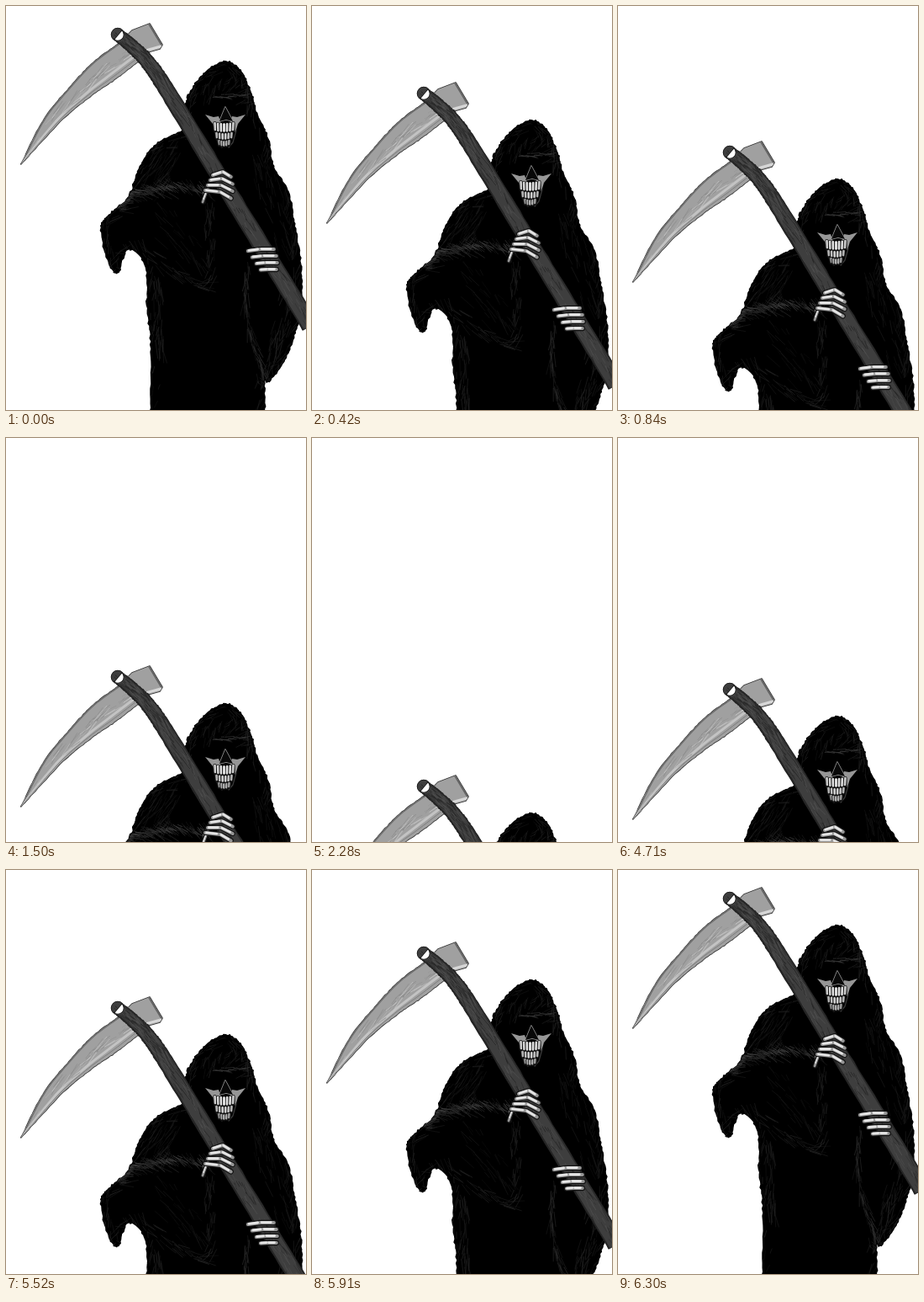
Animation of 357 by 480 pixels, one loop 7140 ms. Source, as an HTML page with a canvas:

```html
<!DOCTYPE html>
<html lang="en">
<head>
<meta charset="utf-8">
<title>Reaper</title>
<style>
  html, body { margin: 0; width: 100%; height: 100%; overflow: hidden; background: #fff; }
  main { position: fixed; inset: 0; overflow: hidden; contain: strict; }
  canvas { display: block; animation: sink 7140ms -1ms infinite; }
  /* 5px every 30ms; the rise skips ahead twice */
  @keyframes sink {
    0% { transform: translateY(0); animation-timing-function: steps(92); }
    38.65546% { transform: translateY(460px); animation-timing-function: steps(1); }
    50.42017% { transform: translateY(460px); animation-timing-function: steps(12); }
    55.46218% { transform: translateY(400px); animation-timing-function: steps(1); }
    55.88235% { transform: translateY(390px); animation-timing-function: steps(17); }
    63.02521% { transform: translateY(305px); animation-timing-function: steps(1); }
    63.44538% { transform: translateY(295px); animation-timing-function: steps(59); }
    88.23529%, 100% { transform: translateY(0); }
  }
</style>
</head>
<body>
<main><canvas id="reaper" width="357" height="480"></canvas></main>
<script>
const g = document.getElementById('reaper').getContext('2d');
g.lineCap = g.lineJoin = 'round';

let seed = 11;
const rnd = () => (seed = (seed * 16807) % 2147483647) / 2147483647;
const vary = r => (rnd() * 2 - 1) * r;
const gray = (v, a = 1) => `rgba(${v},${v},${v},${a})`;

// Smooth curve through key points, as a function of t in 0..1
const curve = (...pts) => t => {
  const n = pts.length - 1, i = Math.max(0, Math.min(n - 1, Math.floor(t * n))), u = t * n - i;
  const [a, b, c, d] = [i - 1, i, i + 1, i + 2].map(k => pts[Math.max(0, Math.min(n, k))]);
  return [0, 1].map(k => b[k] + 0.5 * u * (c[k] - a[k]
    + u * (2 * a[k] - 5 * b[k] + 4 * c[k] - d[k] + u * (3 * (b[k] - c[k]) + d[k] - a[k]))));
};

function heading(at, t) {
  const [x0, y0] = at(t - 0.004), [x1, y1] = at(t + 0.004);
  return Math.atan2(y1 - y0, x1 - x0);
}

const sample = (at, n, rough = 0) =>
  Array.from({ length: n + 1 }, (_, i) => at(i / n).map(v => v + vary(rough)));
const outline = pts => new Path2D('M' + pts.map(p => p.join(' ')).join('L') + 'Z');

function paint(path, fill, edge) {
  g.strokeStyle = edge;
  g.lineWidth = 1.6;
  g.stroke(path);
  g.fillStyle = fill;
  g.fill(path);
}

function line(pts, color, width) {
  g.strokeStyle = color;
  g.lineWidth = width;
  g.beginPath();
  pts.forEach(p => g.lineTo(...p));
  g.stroke();
}

function inside(path, draw) {
  g.save();
  g.clip(path);
  draw();
  g.restore();
}

// Loose strokes that follow a curve, turned from it by tilt
function hairs(n, at, spread, length, tilt, light, width = 0.8) {
  for (let i = 0; i < n; i++) {
    const t = rnd(), a = heading(at, t) + tilt + vary(0.25), len = length * (0.5 + rnd());
    const [x, y] = at(t).map(v => v + vary(spread));
    line([[x, y], [x + Math.cos(a) * len, y + Math.sin(a) * len]], gray(light, 0.3 + rnd() * 0.6), width);
  }
}

function robe() {
  const sleeve = [[166, 308], [145, 289], [133, 317], [121, 302], [113, 264], [123, 248], [146, 226]];
  const hood = [[213, 120], [221, 99], [237, 79], [260, 66], [278, 76], [291, 101], [298, 126]];
  const rim = curve([172, 485], [173, 410], [168, 360], ...sleeve,
    [160, 190], [180, 163], [213, 145], ...hood, [312, 158], [318, 190], [336, 222], [343, 258],
    [350, 300], [352, 345], [345, 385], [332, 420], [313, 446], [308, 446], [308, 485]);
  const cloak = outline(sample(rim, 400, 0.9));
  paint(cloak, '#000', '#000');

  inside(cloak, () => {
    hairs(420, rim, 9, 11, 0.3, 36);
    hairs(50, curve([226, 112], [258, 98], [284, 110]), 10, 9, -0.8, 34);
    hairs(22, curve([246, 107], [281, 107]), 2, 7, 0, 62);
    hairs(60, curve([195, 165], [180, 215]), 14, 13, 0.3, 30);
    // Raised sleeve: bright ridge, then its hanging hem
    const ridge = curve([132, 240], [152, 222], [195, 213], [234, 216]);
    hairs(110, ridge, 4, 8, 0.6, 72);
    hairs(80, ridge, 9, 11, 0.8, 42);
    hairs(70, curve([165, 290], [205, 322], [239, 328], [243, 240]), 6, 12, 0, 38);
    hairs(40, curve([180, 245], [222, 300]), 18, 14, 0, 24);
    // Body folds and the hanging sleeve
    hairs(30, curve([178, 315], [184, 410]), 6, 18, 0, 38);
    hairs(70, curve([288, 305], [287, 370], [307, 436]), 3, 12, 0, 48);
    hairs(50, curve([341, 320], [315, 430]), 9, 14, 0, 36);
    hairs(40, curve([300, 180], [335, 290]), 12, 14, 0, 28);
  });
}

function skull() {
  // Cheekbones mirror each other, the right one in a wider turn
  for (const side of [-1, 1]) {
    const cheek = [[24, 129], [14, 132], [8, 131], [5, 140], [12, 150], [15, 140]];
    g.fillStyle = gray(150);
    g.fill(outline(cheek.map(([x, y]) => [261 + side * x, y])));
    line([[261 + side * 13, 148], [261 + side * 9, 162], [261 + side * 4, 168]], gray(60), 1.2);
  }
  paint(outline([[261, 120], [254, 137], [262, 135], [270, 137]]), '#080808', gray(150));
  // Teeth stand in rows that narrow downward
  [[7, 139, 9, 11], [6, 151, 6, 9], [5, 160, 5, 6]].forEach(([n, y, h, half], r) => {
    for (let i = 0; i < n; i++) {
      const u = i / (n - 1) * 2 - 1, x = 259.5 + u * half, top = y + (1 - u * u) * 1.5;
      line([[x, top], [x, top + h]], '#111', 4.2);
      line([[x, top], [x - u * 0.5, top + h - 1]], gray(238 - r * 25 - Math.abs(u) * 35), 2.7);
    }
  });
}

function blade() {
  const tip = [18, 188];
  const outer = curve(tip, [45, 135], [73, 100], [103, 68], [134, 45]);
  const inner = curve([156, 67], [130, 87], [102, 106], [66, 136], tip);
  const butt = [[150, 29], [171, 21], [186, 46], [183, 51], [165, 56]];
  const steel = outline([...sample(outer, 50, 0.4), ...butt, ...sample(inner, 50, 0.4)]);
  paint(steel, gray(160), gray(50));

  // Strokes at a share k of the way from the outer to the inner edge
  const between = k => t => outer(t).map((v, i) => v + (inner(1 - t)[i] - v) * k);
  inside(steel, () => {
    line(sample(outer, 30), gray(110), 3);
    line(sample(between(0.75), 30), gray(195), 3);
    line(sample(between(0.88), 30), gray(125), 1);
    hairs(40, between(0.5), 4, 14, 0, 135);
    hairs(22, between(0.6), 4, 16, 0, 205);
    line([[171, 21], [186, 46]], gray(100), 4);
    line([[166, 53], [184, 48]], gray(215), 3);
  });
}

function handle() {
  const mid = curve([133, 34], [150, 48], [168, 66], [192, 101], [262, 216], [362, 380]);
  const side = s => t => {
    const a = heading(mid, t) + Math.PI / 2, r = s * (7 + 3 * t), [x, y] = mid(t);
    return [x + Math.cos(a) * r, y + Math.sin(a) * r];
  };
  const wood = outline([...sample(side(1), 90, 0.4), ...sample(side(-1), 90, 0.4).reverse()]);
  const knob = new Path2D();
  knob.arc(133, 34, 7.5, 0, 7);
  wood.addPath(knob);
  paint(wood, gray(62), gray(22));
  inside(wood, () => {
    hairs(170, mid, 7, 12, 0, 38, 1);
    hairs(150, mid, 7, 10, 0, 84);
    line(sample(side(0.95), 60), gray(36), 2);
    line(sample(side(-0.95), 60), gray(40), 1.4);
  });
}

// Jointed bones: pale shafts between rounded joints
function bones(joints, width) {
  line(joints, '#111', width + 2.2);
  line(joints, gray(150), width);
  joints.slice(1).forEach((p, i) => {
    const at = k => joints[i].map((v, c) => v + (p[c] - v) * k - 0.4);
    line([at(0.1), at(0.8)], gray(230), width - 1.4);
  });
}

function hands() {
  for (let i = 3; i >= 0; i--) {
    bones([[234 + i * 0.5, 233], [246 - i * 3.5, 201 + i * 6]], 2.8);
  }
  for (let i = 0; i < 4; i++) {
    bones([[246 - i * 3, 201 + i * 6], [258 - i, 197 + i * 8], [270 - (i - 1.5) ** 2, 203 + i * 8.5]], 4);
    bones([[288 + i * 5, 291 + i * 7.5], [303 + i * 3, 289 + i * 8], [321 - (i - 1.5) ** 2 + i, 289 + i * 8]], 4.2);
  }
}

robe();
skull();
blade();
handle();
hands();
</script>
</body>
</html>
```
